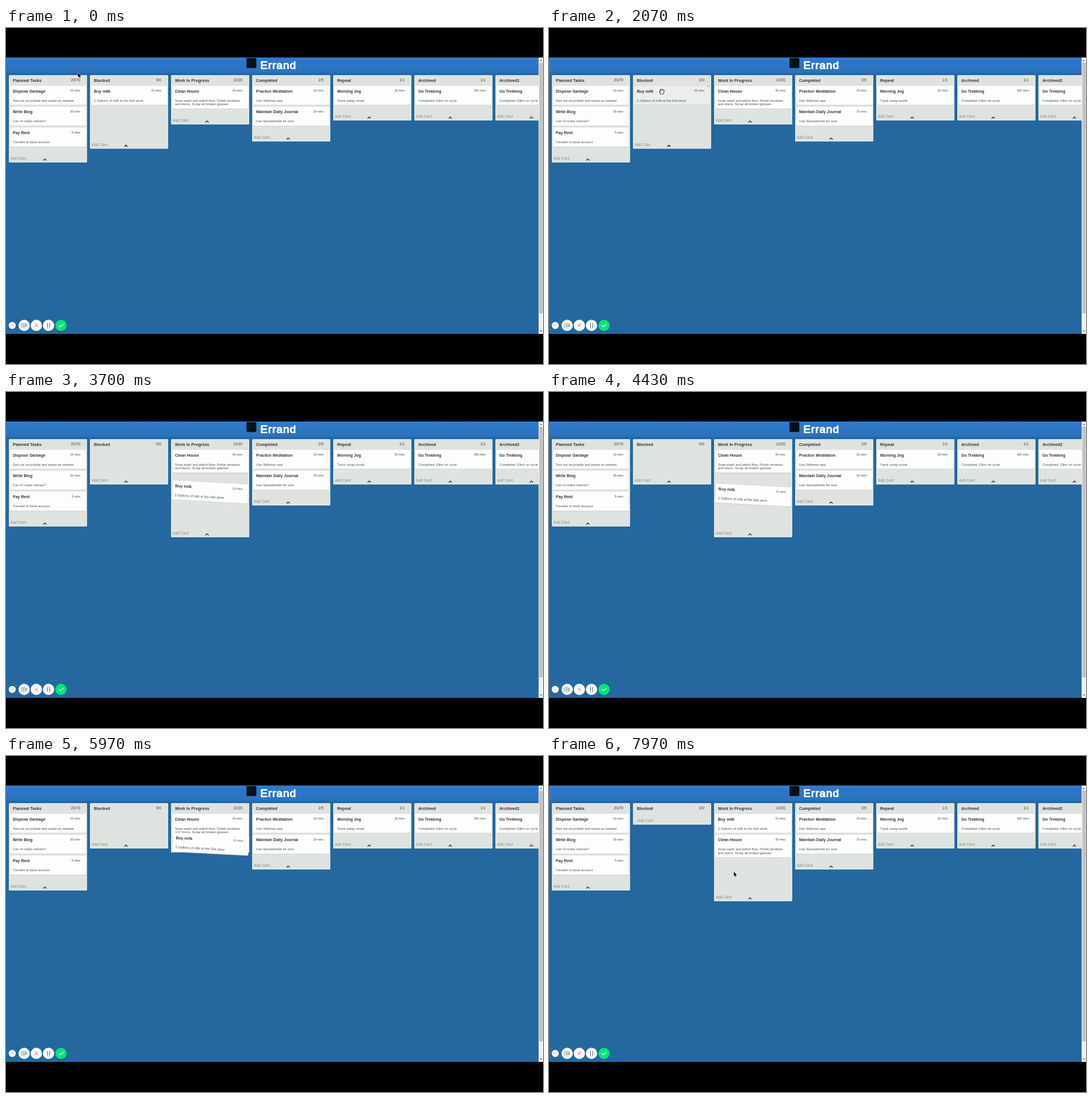
These frames come from a looping animation (947 by 592 pixels, 8 s). An HTML page with a canvas:

```html
<!DOCTYPE html>
<html lang="en">
<head>
<meta charset="utf-8">
<title>Task board</title>
<style>
html, body { margin: 0; width: 100%; height: 100%; overflow: hidden; background: #000; }
canvas { display: block; }
</style>
</head>
<body>
<canvas id="stage" width="947" height="592"></canvas>
<script>
const ctx = document.getElementById('stage').getContext('2d');
const LOOP = 8000, CARD_W = 134, PICK_UP = 2430, DROP = 7000, SETTLED = 7250;
const FONT = '"Liberation Sans", Arial, sans-serif';

const card = (title, mins, ...lines) => ({ title, mins: mins + ' mins', lines });
const milk = card('Buy milk', 15, '2 Gallons of milk at the Deli store');
const house = card('Clean House', 30,
  'Soap wash and polish floor. Polish windows', 'and doors. Scrap all broken glasses');
const trek = card('Go Trekking', 300, 'Completed 10km on cycle');

const lists = [
  ['Planned Tasks', '20/70', 237, [
    card('Dispose Garbage', 10, 'Sort out recyclable and waste as needed'),
    card('Write Blog', 30, 'Can AI make memes?'),
    card('Pay Rent', 5, 'Transfer to bank account')]],
  ['Blocked', '0/0', 212.7, []],
  ['Work In Progress', '10/20', 170, []],
  ['Completed', '2/5', 200, [
    card('Practice Meditation', 15, 'Use Stillmoor app'),
    card('Maintain Daily Journal', 15, 'Use Spreadsheet for now')]],
  ['Repeat', '1/1', 163, [card('Morning Jog', 30, 'Track using runzle')]],
  ['Archived', '1/1', 163, [trek]],
  ['Archived2', '1/1', 163, [trek]]
];

// Keys are [time, x, y]; every segment eases in and out.
const arrowPath = [[30, 127, 79], [800, 150, 92], [1600, 197, 109]];
const leavePath = [[7730, 338, 150], [7960, 326, 204]];
const dragPath = [[PICK_UP, 217, 118.5], [3130, 348, 157.2], [3700, 360, 176], [4430, 360.5, 181.3],
  [5270, 359.5, 157.2], [5900, 361, 155], [6700, 364.5, 138.3], [DROP, 364, 134], [SETTLED, 360, 118.5]];

const progress = (t, from, to) => {
  const p = Math.min(1, Math.max(0, (t - from) / (to - from)));
  return p * p * (3 - 2 * p);
};

function follow(path, t) {
  let [, x, y] = path[0];
  for (let i = 1; i < path.length; i++) {
    const [start, x0, y0] = path[i - 1], [end, x1, y1] = path[i];
    if (t < start) break;
    const p = progress(t, start, end);
    x = x0 + (x1 - x0) * p;
    y = y0 + (y1 - y0) * p;
  }
  return [x, y];
}

function text(str, x, y, size, color, weight = 400, align = 'left') {
  ctx.font = `${weight} ${size}px ${FONT}`;
  ctx.textAlign = align;
  ctx.fillStyle = color;
  ctx.fillText(str, x, y);
}

function box(x, y, w, h, color, radius = 0) {
  ctx.fillStyle = color;
  ctx.beginPath();
  ctx.roundRect(x, y, w, h, radius);
  ctx.fill();
}

function line(points, color, width = 1) {
  ctx.strokeStyle = color;
  ctx.lineWidth = width;
  ctx.beginPath();
  points.forEach(([x, y]) => ctx.lineTo(x, y));
  ctx.stroke();
}

function disc(x, y, r, color) {
  ctx.fillStyle = color;
  ctx.beginPath();
  ctx.arc(x, y, r, 0, 7);
  ctx.fill();
}

const cardHeight = c => 27 + 6.5 * c.lines.length;

function drawCard(c, x, y, hover) {
  const h = cardHeight(c);
  box(x, y + 0.7, CARD_W, h, '#c3c9c3', 1.5);
  box(x, y, CARD_W, h, hover ? '#eceeec' : '#fdfefc', 1.5);
  text(c.title, x + 5, y + 11.5, 7, '#333', 700);
  text(c.mins, x + 124, y + 10.2, 5.15, '#444', 400, 'right');
  c.lines.forEach((l, i) => text(l, x + 5, y + 27.5 + 6.5 * i, 5.93, '#4d4d4d'));
}

function drawList([title, count, bottom, cards], i) {
  const x = 5 + 143 * i, closed = bottom < 130;
  box(x, 83, 138, bottom - 83, '#dfe3df', 1.5);
  text(title, x + 7, 94.6, 7.32, '#333', 700);
  text(count, x + 126, 94, 6.6, '#444', 400, 'right');
  text('Add Card', x + (closed ? 8 : 3), bottom - 4.7, 6.6, '#8a8c8a');
  if (!closed) {
    const cx = x + 63.5, cy = bottom - 4;
    line([[cx - 2.4, cy], [cx, cy - 2.4], [cx + 2.4, cy]], '#222', 1.3);
  }
  let y = 102;
  for (const c of cards) {
    drawCard(c, x + 2, y);
    y += cardHeight(c) + 3.3;
  }
}

function drawHeader() {
  const shade = ctx.createLinearGradient(0, 52, 0, 79);
  shade.addColorStop(0, '#2f7bcf');
  shade.addColorStop(1, '#2b71bd');
  box(0, 52, 940, 27, shade);
  box(424, 53, 17.5, 17.5, '#07111c', 2);
  ctx.letterSpacing = '1px';
  text('Errand', 448.5, 71.5, 19.2, '#fff');
  ctx.strokeStyle = '#fff';
  ctx.lineWidth = 1.2;
  ctx.strokeText('Errand', 448.5, 71.5);
  ctx.letterSpacing = '0px';
}

function drawScrollbar() {
  box(939.3, 52, 7.7, 487, '#f1f1f1');
  box(940.5, 61, 6, 442, '#c1c1c1');
  for (const [y, d] of [[57, -1], [534, 1]]) {
    ctx.fillStyle = '#505050';
    ctx.beginPath();
    ctx.moveTo(941.5, y - d);
    ctx.lineTo(945.5, y - d);
    ctx.lineTo(943.5, y + d);
    ctx.fill();
  }
}

function drawRecorder() {
  disc(11, 524, 6.2, '#fff');
  line([[8, 524], [14, 524]], '#e6b39c');
  for (const x of [32, 53.5, 75, 97]) {
    disc(x, 524.4, 10.2, 'rgba(0,30,60,.2)');
    disc(x, 524, 10, x === 97 ? '#00e676' : '#fff');
  }
  ctx.strokeStyle = '#688e93';
  ctx.lineWidth = 0.9;
  ctx.strokeRect(27.5, 521, 6.5, 6);
  line([[34, 523], [36.5, 521.5], [36.5, 526.5], [34, 525]], '#688e93', 0.9);
  line([[29.2, 524], [32.4, 524]], '#688e93', 0.9);
  line([[30.8, 522.4], [30.8, 525.6]], '#688e93', 0.9);
  line([[50.5, 521], [56.5, 527]], '#e5646e');
  line([[56.5, 521], [50.5, 527]], '#e5646e');
  line([[73.3, 520.5], [73.3, 527.5]], '#56807c', 1.3);
  line([[76.9, 520.5], [76.9, 527.5]], '#56807c', 1.3);
  line([[93.5, 524], [96, 526.5], [100.7, 521.8]], '#fff', 1.3);
}

function drawShape(x, y, path, fill, stroke, width) {
  ctx.save();
  ctx.translate(x, y);
  ctx.lineWidth = width;
  ctx.fillStyle = fill;
  ctx.strokeStyle = stroke;
  ctx.stroke(path);
  ctx.fill(path);
  ctx.restore();
}
const arrow = new Path2D('M0 0V7.5L1.7 6 2.8 8.7 4.1 8.1 3 5.5H5.3Z');
const hand = new Path2D('M-1.8 4.2L-3.8 .8Q-3.8-.5-2.2.8L-2.8-2.6Q-2-4-1.2-2.6Q-.6-4.6.3-3' +
  'Q1.2-4.2 1.8-2.4Q3.4-3.3 3.5-1.4L3.1 2 2 4.2Z');

function drawCursor(t) {
  if (t < 1600) drawShape(...follow(arrowPath, t), arrow, '#000', '#dde6f0', 0.8);
  else if (t < 3230) {
    drawShape(199, 112, hand, '#fff', '#111', 1.8);
    line([[-1.1, -2.4], [-0.9, -0.6]].map(([x, y]) => [199 + x, 112 + y]), '#333', 0.6);
    line([[1, -2.4], [1, -0.6]].map(([x, y]) => [199 + x, 112 + y]), '#333', 0.6);
  } else if (t >= SETTLED) drawShape(...follow(leavePath, t), arrow, '#000', '#eee', 0.8);
}

function draw(t) {
  const dragging = t >= PICK_UP && t < SETTLED;
  const expanded = t > 3270 && t < 5000 || t > 6000;
  const slide = progress(t, 6570, 6760);
  lists[1][2] = t < 2500 ? 212.7 : t < SETTLED ? 163 : 121;
  lists[2][2] = expanded ? 256 : 170;

  box(0, 0, 947, 592, '#000');
  box(0, 52, 947, 487, '#24689f');
  drawHeader();
  lists.forEach(drawList);
  drawCard(house, 293, 102 + 36.8 * slide, t > 6570 && t < SETTLED);

  if (dragging) {
    const [x, y] = follow(dragPath, t);
    const tilt = 3 * (progress(t, PICK_UP, 2580) - progress(t, DROP, SETTLED));
    ctx.save();
    ctx.translate(x, y);
    ctx.rotate(tilt * Math.PI / 180);
    drawCard(milk, -67, -16.5);
    ctx.restore();
  } else {
    const hover = t >= 1500 && t < PICK_UP;
    drawCard(milk, t < PICK_UP ? 150 : 293, 102, hover);
    if (hover) line([[279, 101.5], [281, 104], [283, 102]], '#74b53c', 0.9);
  }

  drawScrollbar();
  drawRecorder();
  drawCursor(t);
}

ctx.lineJoin = ctx.lineCap = 'round';
const start = performance.now();
function tick() {
  draw((performance.now() - start) % LOOP);
  requestAnimationFrame(tick);
}
tick();
</script>
</body>
</html>
```
